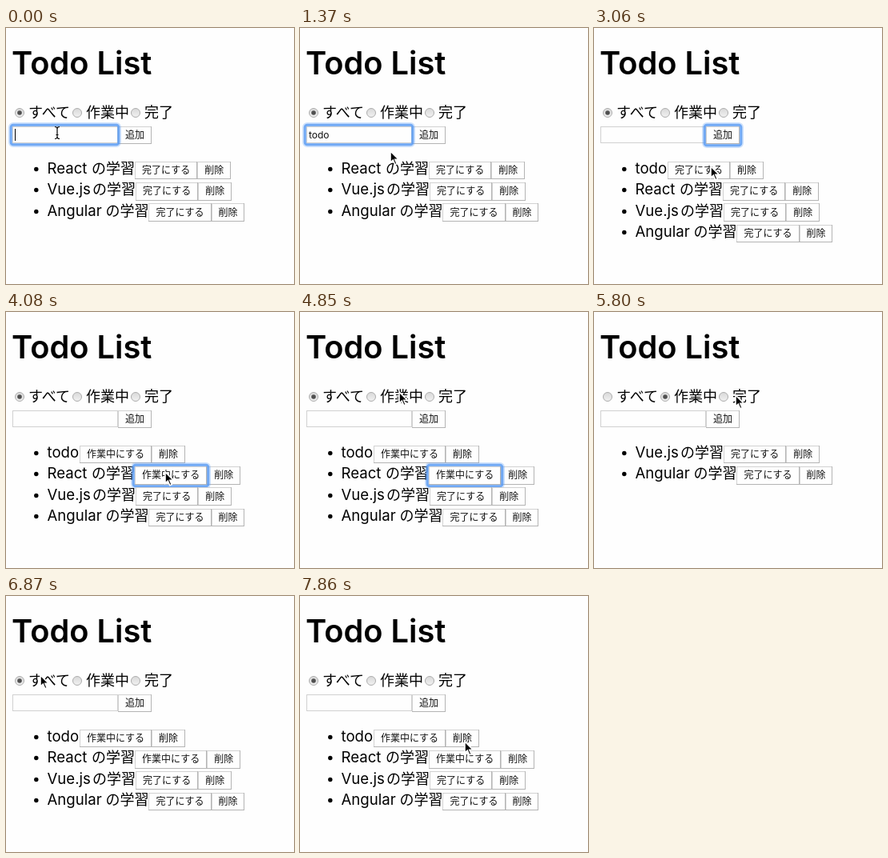
Recreate the animation shown at these times as an HTML page. Size 360 by 320 pixels, loop 8 s.

```html
<!DOCTYPE html>
<html lang="ja">
<head>
<meta charset="utf-8">
<title>Todo List</title>
<style>
  html, body { margin: 0; width: 100%; height: 100%; overflow: hidden; background: #fefefe; }
  svg { display: block; width: 360px; height: 320px; }
  text { font: 18px Inter, "Noto Sans CJK JP", "Noto Sans CJK", sans-serif; fill: #000; white-space: pre; }
  .title { font-size: 39.8px; font-weight: 600; }
  .name { font-size: 18.6px; }
  .small { font-size: 12px; fill: #111; }
  .jp { font-family: "Noto Sans CJK JP", "Noto Sans CJK", sans-serif; }
  .end { text-anchor: end; }
  .mid { text-anchor: middle; }
</style>
</head>
<body>
<svg viewBox="0 0 360 320">
  <defs>
    <linearGradient id="knob" x2="0" y2="1">
      <stop stop-color="#d9d9d9"/><stop offset="1" stop-color="#f1f1f1"/>
    </linearGradient>
  </defs>
  <rect width="360" height="320" fill="#fefefe"/>
  <text class="title" x="7" y="58">Todo List</text>
  <g id="page"></g>
  <g id="field">
    <text id="typed" class="small" x="11" y="138"></text>
    <rect id="caret" y="126" width="1" height="15"/>
  </g>
  <path id="arrow" d="M0 0V14.2L3.3 11.1 5.8 16.8 8.2 15.7 5.8 10.2H10.3Z" stroke="#fff" stroke-width="1.6"/>
  <path id="beam" d="M-3-7.5Q0-7.5 0-5Q0-7.5 3-7.5M0-5V5M-3 7.5Q0 7.5 0 5Q0 7.5 3 7.5M-1.5 2.5H1.5" fill="none" stroke="#000" stroke-width="1.2"/>
</svg>
<script>
const LOOP = 8000;
const ROW = 26.4;
const FILTERS = [['すべて', 17], ['作業中', 89], ['完了', 162]];
// name, left edge of its buttons, time it is added, time it is completed
const ITEMS = [
  ['todo', 91.8, 1950, 3300],
  ['React', 161, 0, 4080],
  ['Vue.js', 162, 0, Infinity],
  ['Angular', 178.4, 0, Infinity]
];
const FOCUS = [[0, 'input'], [1900, 'add'], [3300, 'todo'], [4020, 'React'], [5090, '']];
const FILTER = [[0, 0], [5090, 1], [5980, 2], [6870, 0]];
const TYPED = [[0, ''], [360, 't'], [460, 'to'], [560, 'tod'], [660, 'todo'], [1950, '']];
// start, end, step count, control point, end point
const START = [64, 131];
const MOVES = [
  [1080, 1720, 10, [112, 177], [163, 130]],
  [2310, 3060, 14, [231, 146], [146, 173]],
  [3600, 3840, 5, [170, 184], [199, 200]],
  [4560, 4850, 5, [166, 150], [124, 100]],
  [5450, 5450, 1, [125, 100], [125, 100]],
  [5680, 5800, 3, [150, 100], [177, 104]],
  [6400, 6690, 6, [110, 103], [43, 99]],
  [7170, 7860, 13, [367, 262], [206, 182]]
];

const $ = id => document.getElementById(id);
const at = (steps, t) => steps.filter(([time]) => time <= t).pop()[1];
const ease = p => (1 - Math.cos(Math.PI * p)) / 2;

function pointer(t) {
  let from = START;
  for (const [start, end, count, bend, to] of MOVES) {
    if (t < start) break;
    if (t < end) {
      const step = Math.floor((t - start) / (end - start) * (count - 1)) + 1;
      const p = ease(step / count), q = 1 - p;
      return from.map((v, i) => Math.round(q * q * v + 2 * p * q * bend[i] + p * p * to[i]));
    }
    from = to;
  }
  return from;
}

const box = (x, y, w, h, fill) =>
  `<rect x="${x}" y="${y}" width="${w}" height="${h}" fill="${fill}"/>`;

const ring = (x, y, w, h) => [[2.5, 5, .3], [1.8, 3, .8]].map(([pad, line, alpha]) =>
  `<rect x="${x - pad}" y="${y - pad}" width="${w + 2 * pad}" height="${h + 2 * pad}" rx="${pad + 1}"
    fill="none" stroke="#5b9bf3" stroke-width="${line}" opacity="${alpha}"/>`).join('');

// Button edges snap outward to whole pixels vertically.
function button(left, right, top, label, focused) {
  const x = Math.round(left), w = Math.round(right) - x;
  const y = Math.floor(top), h = Math.ceil(top + 21.8) - y;
  return box(x, y, w, h, '#b4b4b4') + box(x, y, w - 1, h - 1, '#d2d2d2') +
    box(x + 1, y + 1, w - 2, h - 2, '#fefefe') +
    `<text class="small jp mid" x="${(left + right) / 2}" y="${Math.round(top) + 15}">${label}</text>` +
    (focused ? ring(x, y, w, h) : '');
}

function radio([label, x], on) {
  return `<circle cx="${x}" cy="106" r="5.5" fill="url(#knob)" stroke="#adadad"/>` +
    (on ? `<circle cx="${x}" cy="106" r="2.8" fill="#505050"/>` : '') +
    `<text class="jp" x="${x + 11}" y="112">${label}</text>`;
}

function row([name, x, , doneAt], i, t, focus) {
  const done = t >= doneAt;
  const top = 167 + ROW * i, base = Math.round(182 + ROW * i);
  const split = x + (done ? 90.3 : 78.3);
  return `<circle cx="37.8" cy="${base - 5.5}" r="2.7"/>` +
    `<text class="name" x="51.5" y="${base}">${name}</text>` +
    (name === 'todo' ? '' : `<text class="jp end" x="${x}" y="${base}">の学習</text>`) +
    button(split, split + 41.7, top, '削除') +
    button(x, split, top, done ? '作業中にする' : '完了にする', focus === name);
}

function page(t) {
  const focus = at(FOCUS, t), filter = at(FILTER, t);
  const shown = ITEMS.filter(([, , addedAt, doneAt]) =>
    t >= addedAt && (filter === 0 || (t >= doneAt) === (filter === 2)));
  return FILTERS.map((f, i) => radio(f, i === filter)).join('') +
    box(8, 123, 132, 21, '#d0d0d0') + box(9, 124, 130, 19, '#fefefe') +
    button(140, 182, 123, '追加', focus === 'add') +
    (focus === 'input' ? ring(8, 123, 131, 21) : '') +
    shown.map((item, i) => row(item, i, t, focus)).join('');
}

let drawn = '';
function draw(now) {
  const t = now % LOOP;
  const html = page(t);
  if (html !== drawn) $('page').innerHTML = drawn = html;

  const typed = at(TYPED, t);
  if ($('typed').textContent !== typed) $('typed').textContent = typed;
  const caretOn = t < 1180 || (t >= 1690 && t < 1900);
  $('caret').setAttribute('x', 11 + Math.round(typed ? $('typed').getComputedTextLength() : 0));
  $('caret').setAttribute('visibility', caretOn ? 'visible' : 'hidden');

  const [x, y] = pointer(t);
  const overField = x < 140 && y > 122 && y < 144;
  for (const [id, on] of [['arrow', !overField], ['beam', overField]]) {
    $(id).setAttribute('transform', `translate(${x} ${y})`);
    $(id).setAttribute('visibility', on ? 'visible' : 'hidden');
  }
}

const begin = performance.now();
function tick() {
  draw(performance.now() - begin);
  requestAnimationFrame(tick);
}
tick();
</script>
</body>
</html>
```
